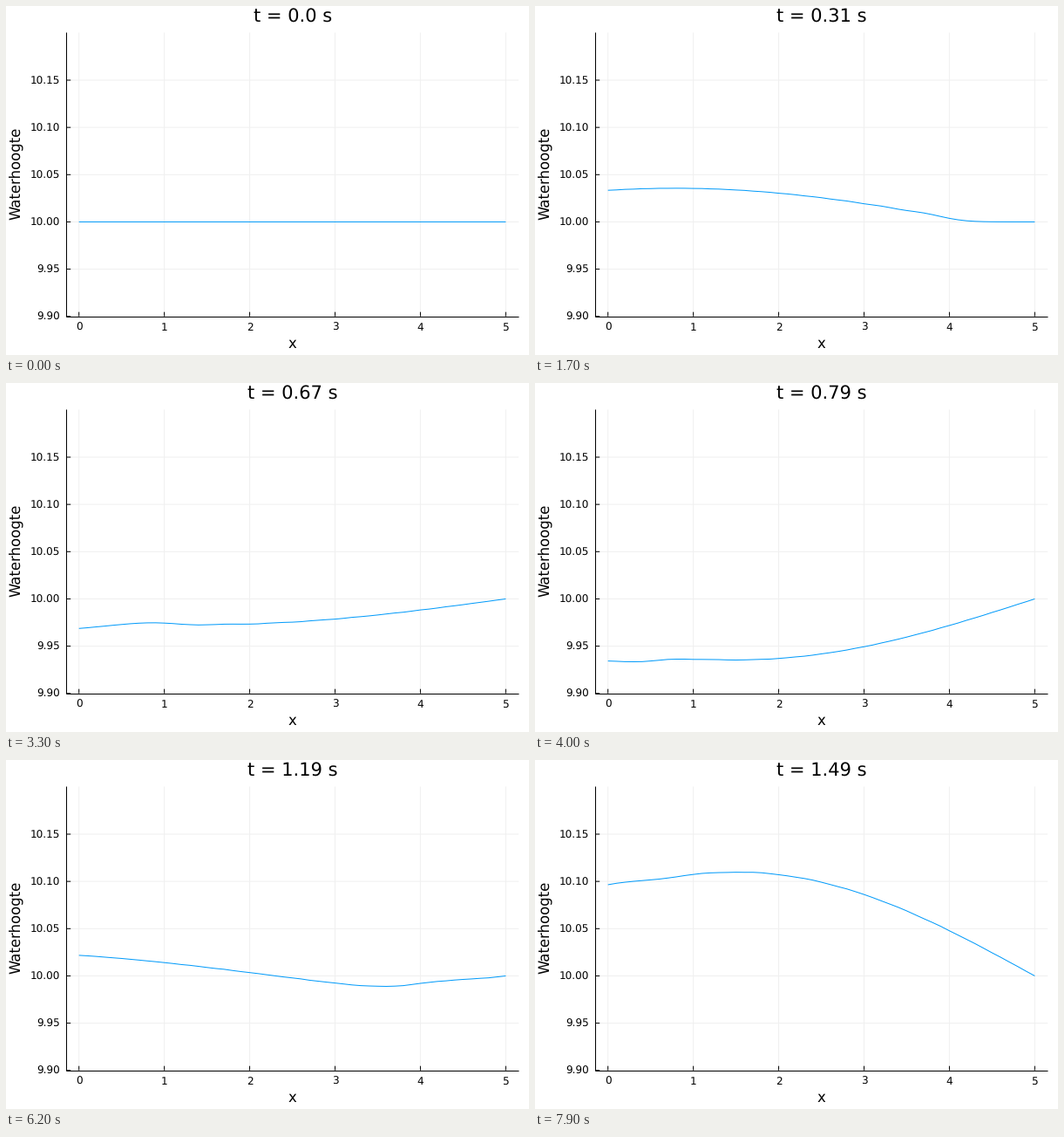
Write a matplotlib script that moves like this. It is 600 px wide and 400 px high and loops after 8000 ms.

```python
import numpy as np
import matplotlib.pyplot as plt
from matplotlib.animation import FuncAnimation

plt.rcParams["font.family"] = "DejaVu Sans"
plt.rcParams["text.hinting"] = "none"

FRAMES, STEP_MS = 80, 100
PX = 0.72  # one pixel in points at 100 dpi

# Shallow water channel: oscillating inflow on the left, fixed level on the right
LENGTH, CELLS = 5.0, 100
SPEED = 13.95
AMP, OMEGA = 0.0356, 2 * np.pi
x = np.linspace(0, LENGTH, CELLS + 1)
dx = x[1]

# The clock runs with uneven solver steps
KNOTS = [0, 17, 18, 26, 27, 36, 40, 53, 54, 63, 70, 79]
TIMES = [0, .3065, .329, .516, .538, .737, .789, 1.03, 1.05, 1.209, 1.338, 1.486]
clock = np.interp(np.arange(FRAMES), KNOTS, TIMES)


def slope(state, t):
    level, flow = state
    d_level = -SPEED * np.gradient(flow, dx)
    d_flow = -SPEED * np.gradient(level, dx)
    d_level[-1] = 0
    d_flow[0] = AMP * OMEGA * np.cos(OMEGA * t)
    return np.array([d_level, d_flow])


def advance(state, t, dt):
    k1 = slope(state, t)
    k2 = slope(state + dt / 2 * k1, t + dt / 2)
    k3 = slope(state + dt / 2 * k2, t + dt / 2)
    k4 = slope(state + dt * k3, t + dt)
    return state + dt / 6 * (k1 + 2 * k2 + 2 * k3 + k4)


def solve():
    state = np.zeros((2, x.size))
    levels = [state[0]]
    for t0, t1 in zip(clock[:-1], clock[1:]):
        n = int(np.ceil((t1 - t0) / 0.001))
        dt = (t1 - t0) / n
        for i in range(n):
            state = advance(state, t0 + i * dt, dt)
        levels.append(state[0])
    return levels


levels = solve()

fig = plt.figure(figsize=(6, 4), dpi=100, facecolor="white")
ax = fig.add_axes([0, 0, 1, 1])
ax.set_xlim(0, 600)
ax.set_ylim(400, 0)
ax.axis("off")

LEFT, RIGHT, TOP, BOTTOM = 69.2, 588.2, 30.5, 355.7


def px(v):
    return 83.7 + 97.93 * v


def py(h):
    return 247.45 - 1083 * (h - 10)


def line(xs, ys, color="black", z=2, snap=False):
    ax.plot(xs, ys, color=color, lw=PX, zorder=z, snap=snap,
            solid_capstyle="butt")


def text(tx, ty, s, size, ha="center", **kw):
    return ax.text(tx, ty, s, fontsize=size * PX, ha=ha, va="baseline", **kw)


for v in range(6):
    gx = px(v)
    line([gx, gx], [TOP, BOTTOM], "#f0f0f0", 1)
    line([gx, gx], [BOTTOM - 5, BOTTOM])
    text(gx, 371.7, str(v), 12)

for h in np.arange(9.90, 10.16, 0.05):
    gy = py(h)
    if h > 9.91:
        line([LEFT, RIGHT], [gy, gy], "#f0f0f0", 1)
    line([LEFT, LEFT + 5], [gy, gy])
    text(61.7, gy + 4.4, f"{h:.2f}", 12, ha="right")

line([LEFT, LEFT], [TOP - 0.5, BOTTOM + 0.5], snap=True)
line([LEFT - 0.5, RIGHT], [BOTTOM, BOTTOM], snap=True)
text(328.7, 391.7, "x", 16.5)
text(17, 192.2, "Waterhoogte", 16.5, rotation=90, rotation_mode="anchor")

title = text(329, 18, "", 21)
wave, = ax.plot([], [], color="#009afa", lw=PX, zorder=3, snap=False,
                solid_capstyle="butt")


def draw(i):
    wave.set_data(px(x), py(10 + levels[i]))
    title.set_text(f"t = {round(float(clock[i]), 2)} s")
    return wave, title


anim = FuncAnimation(fig, draw, frames=FRAMES, interval=STEP_MS,
                     repeat=True, repeat_delay=0)
plt.show()
```
